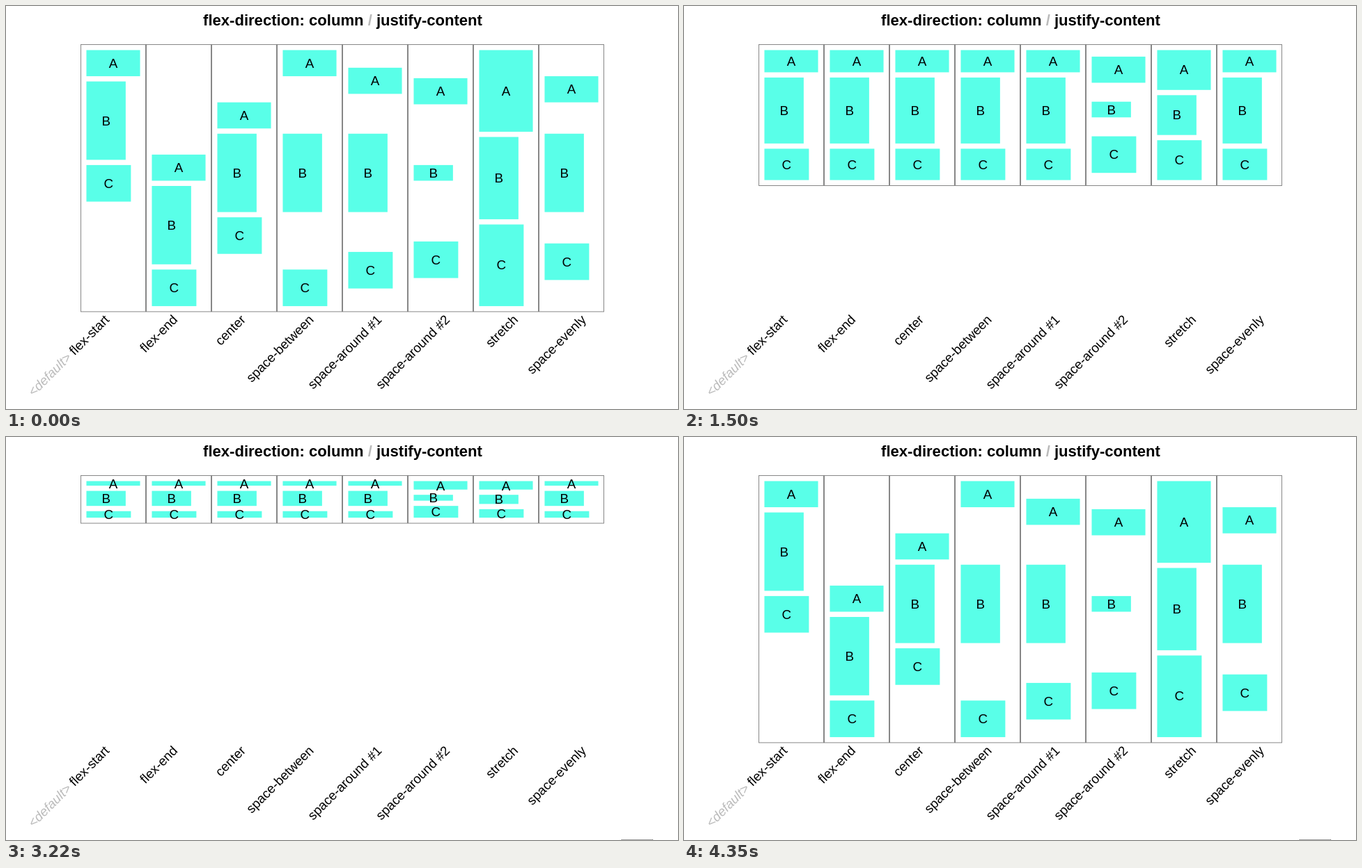
Animation of 965 by 580 pixels, one loop 4730 ms. Source, as an HTML page:

```html
<!DOCTYPE html>
<html lang="en">
<head>
<meta charset="utf-8">
<title>flex-direction: column / justify-content</title>
<style>
  html, body {
    margin: 0;
    width: 100%;
    height: 100%;
    overflow: hidden;
    background: #fff;
  }
  body {
    position: relative;
    font-family: "Liberation Sans", Arial, sans-serif;
    color: #000;
  }
  svg {
    position: absolute;
    left: 0;
    top: 0;
  }
  .title {
    font-size: 22.07px;
    font-weight: bold;
    text-anchor: middle;
  }
  .labels {
    font-size: 18.8px;
    text-anchor: end;
  }
  .dim { fill: #bbb; }
  .labels .dim { font-style: italic; }

  .board {
    position: absolute;
    left: 107px;
    top: 55px;
    width: 800px;
    height: 410px;
    display: flex;
    transform: scale(.94);
    transform-origin: 0 0;
    animation: squeeze 4730ms infinite;
  }
  .col {
    box-sizing: border-box;
    width: 100px;
    padding: 8px;
    border: 1px solid #808080;
    display: flex;
    flex-direction: column;
    gap: 8px;
  }
  .col i {
    display: flex;
    align-items: center;
    justify-content: center;
    min-height: 0;
    background: #59ffe8;
    font: 20px/24px "Liberation Sans", Arial, sans-serif;
  }
  .col i:nth-child(1) { height: 40px; }
  .col i:nth-child(2) { height: 120px; width: 60px; }
  .col i:nth-child(3) { height: 56px; width: 68px; }

  .end     { justify-content: flex-end; }
  .center  { justify-content: center; }
  .between { justify-content: space-between; }
  .around  { justify-content: space-around; }
  .evenly  { justify-content: space-evenly; }
  .short i:nth-child(2) { height: 24px; }
  .stretch i { flex: 1 1 0; }

  /* Slow squeeze, then a bounce back to full height */
  @keyframes squeeze {
    0% { height: 410px; animation-timing-function: linear; }
    10.254% { height: 410px; animation-timing-function: cubic-bezier(.333, .362, .667, .707); }
    21.776% { height: 292px; animation-timing-function: cubic-bezier(.333, .397, .667, .708); }
    31.712% { height: 217px; animation-timing-function: cubic-bezier(.333, .395, .667, .743); }
    49.26% { height: 119px; animation-timing-function: cubic-bezier(.333, .56, .667, 1); }
    67.442% { height: 72.5px; animation-timing-function: cubic-bezier(.333, 0, .667, .333); }
    76.36% { height: 410px; animation-timing-function: cubic-bezier(.333, .667, .667, 1); }
    80.82% { height: 325.6px; animation-timing-function: cubic-bezier(.333, 0, .667, .333); }
    85.277% { height: 410px; animation-timing-function: cubic-bezier(.333, .667, .667, 1); }
    87.507% { height: 388.9px; animation-timing-function: cubic-bezier(.333, 0, .667, .333); }
    89.737% { height: 410px; animation-timing-function: cubic-bezier(.333, .667, .667, 1); }
    90.852% { height: 404.7px; animation-timing-function: cubic-bezier(.333, 0, .667, .333); }
    91.966%, 100% { height: 410px; }
  }

  .dots {
    position: absolute;
    left: 884px;
    top: 579px;
    width: 46px;
    height: 1px;
    background: repeating-linear-gradient(90deg, #444 0 1px, #fff 1px 2px);
    animation: appear 4730ms step-end infinite;
  }
  @keyframes appear {
    0% { opacity: 0; }
    39%, 100% { opacity: 1; }
  }
</style>
</head>
<body>
<svg width="965" height="580" viewBox="0 0 965 580">
  <text class="title" x="483.5" y="28">flex-direction: column <tspan class="dim">/</tspan> justify-content</text>
  <g class="labels">
    <text transform="translate(149.5 452.5) rotate(-45)"><tspan class="dim">&lt;default&gt;</tspan> flex-start</text>
    <text transform="translate(247.3 452.5) rotate(-45)">flex-end</text>
    <text transform="translate(345.1 452.5) rotate(-45)">center</text>
    <text transform="translate(442.9 452.5) rotate(-45)">space-between</text>
    <text transform="translate(540.7 452.5) rotate(-45)">space-around #1</text>
    <text transform="translate(638.5 452.5) rotate(-45)">space-around #2</text>
    <text transform="translate(736.3 452.5) rotate(-45)">stretch</text>
    <text transform="translate(834.1 452.5) rotate(-45)">space-evenly</text>
  </g>
</svg>
<div class="board">
  <div class="col"><i>A</i><i>B</i><i>C</i></div>
  <div class="col end"><i>A</i><i>B</i><i>C</i></div>
  <div class="col center"><i>A</i><i>B</i><i>C</i></div>
  <div class="col between"><i>A</i><i>B</i><i>C</i></div>
  <div class="col around"><i>A</i><i>B</i><i>C</i></div>
  <div class="col around short"><i>A</i><i>B</i><i>C</i></div>
  <div class="col stretch"><i>A</i><i>B</i><i>C</i></div>
  <div class="col evenly"><i>A</i><i>B</i><i>C</i></div>
</div>
<div class="dots"></div>
</body>
</html>
```
